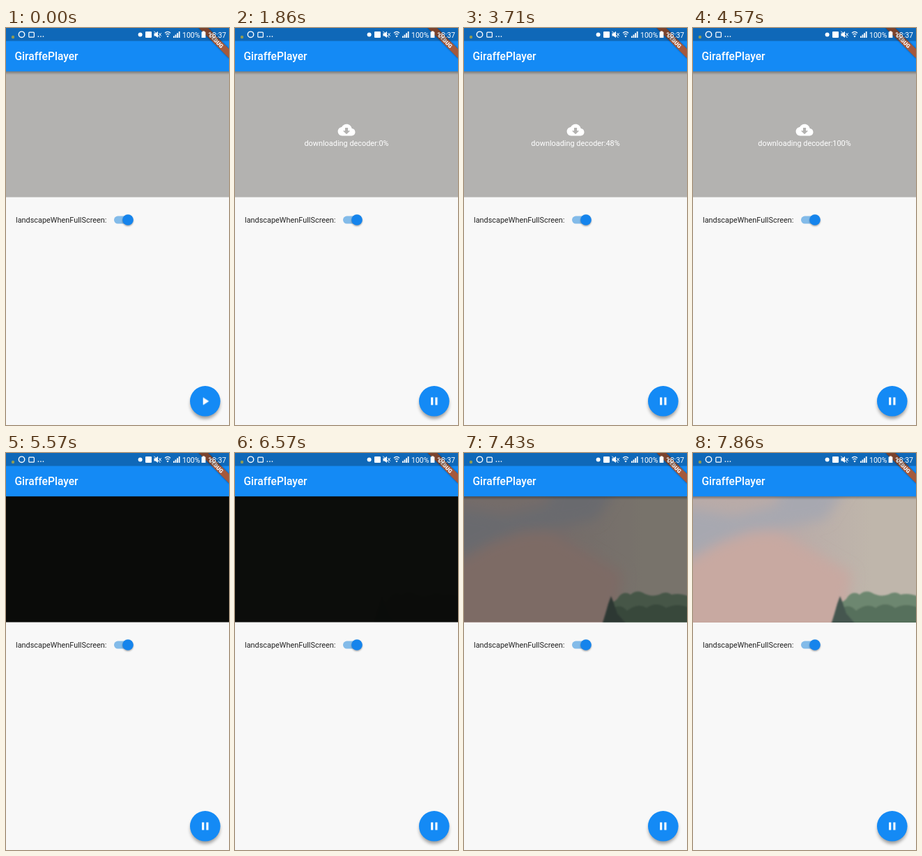
Write an HTML page that moves like this. It is 320 by 569 pixels and loops after 8000 ms.

```html
<!DOCTYPE html>
<html lang="en">
<head>
<meta charset="utf-8">
<title>Player demo</title>
<style>
html, body { margin: 0; width: 100%; height: 100%; overflow: hidden; background: #f8f8f8; }
svg { display: block; width: 320px; height: 569px; font-family: Roboto, sans-serif; }
.title { font-size: 15.6px; font-weight: 500; fill: #fff; }
.label { font-size: 10.9px; fill: #222; }
.info { font-size: 10.9px; fill: #fff; text-anchor: middle; }
.status { font-size: 10.5px; fill: #fff; }
.dots { font-size: 12.5px; font-weight: 500; fill: #fff; }
.debug { font-size: 7.9px; font-weight: 900; fill: #fff; text-anchor: middle; }
.play, .pause, .download, .screen, .video { animation: 8s step-end infinite; }
.play { animation-name: play; }
.pause { animation-name: pause; }
.download { animation-name: download; }
.screen { animation-name: screen; }
.video { animation-name: video; }
@keyframes play { 0% { opacity: 1; } 17.875%, 100% { opacity: 0; } }
@keyframes pause { 0% { opacity: 0; } 17.875%, 100% { opacity: 1; } }
@keyframes download { 0% { opacity: 0; } 17.875% { opacity: 1; } 62.5%, 100% { opacity: 0; } }
@keyframes screen { 0% { fill: #b3b2b0; } 62.5%, 100% { fill: #0a0b09; } }
@keyframes video {
  0% { opacity: 0; }
  82.125% { opacity: .015; animation-timing-function: steps(4, end); }
  89.25% { opacity: .35; animation-timing-function: steps(5, end); }
  98.25%, 100% { opacity: 1; }
}
</style>
</head>
<body>
<svg viewBox="0 0 320 569">
  <defs>
    <clipPath id="frame"><rect y="62" width="320" height="180.5"/></clipPath>
    <filter id="soft" x="-20%" y="-20%" width="140%" height="140%"><feGaussianBlur stdDeviation="9"/></filter>
    <filter id="blur" x="-50%" y="-50%" width="200%" height="200%"><feGaussianBlur stdDeviation="2.6"/></filter>
    <filter id="fine" x="-50%" y="-50%" width="200%" height="200%"><feGaussianBlur stdDeviation="1"/></filter>
    <linearGradient id="shade" x2="0" y2="1">
      <stop stop-opacity=".32"/><stop offset="1" stop-opacity="0"/>
    </linearGradient>
    <linearGradient id="sky" x2="1" y2="0">
      <stop offset=".45" stop-color="#b9aba8"/><stop offset=".8" stop-color="#bfb6ab"/>
    </linearGradient>
  </defs>

  <rect width="320" height="569" fill="#f8f8f8"/>
  <rect class="screen" y="62" width="320" height="180.5"/>

  <g class="video" clip-path="url(#frame)">
    <rect y="62" width="320" height="181" fill="url(#sky)"/>
    <g filter="url(#soft)">
      <path d="M-30 75L60 90L120 75L130 40H225L190 95L125 108L80 112L40 127L-30 165Z" fill="#a7a8b0"/>
      <path d="M-30 165L0 152L40 129L84 114L118 112L155 130L190 150L228 172L212 270H-30Z" fill="#c8a9a1"/>
    </g>
    <g filter="url(#fine)">
      <path d="M212 246V214Q219 212 222 206Q230 197 239 203Q247 196 256 200Q268 207 280 203Q290 197 298 203Q310 200 324 206V246Z" fill="#6d8770"/>
      <path d="M212 246V224Q224 214 234 226Q250 214 262 222Q276 212 290 222Q306 214 324 222V246Z" fill="#566f5c"/>
      <path d="M198 246L203 230L207 216L211 205L215 215L220 230L234 246Z" fill="#455650"/>
    </g>
  </g>

  <g class="download" fill="#fff">
    <path transform="translate(147.6 133.7) scale(1.037)" d="M19.35 10.04C18.67 6.59 15.64 4 12 4 9.11 4 6.6 5.64 5.35 8.04 2.34 8.36 0 10.91 0 14c0 3.31 2.69 6 6 6h13c2.76 0 5-2.24 5-5 0-2.64-2.05-4.78-4.65-4.96zM17 13l-5 5-5-5h3V9h4v4h3z"/>
    <text class="info" x="160" y="168.6">downloading decoder:<tspan id="percent">0</tspan>%</text>
  </g>

  <rect y="62" width="320" height="5" fill="url(#shade)"/>
  <rect width="320" height="62.2" fill="#148af5"/>
  <text class="title" x="12.4" y="46">GiraffePlayer</text>

  <g transform="translate(320) rotate(45)">
    <rect x="-31" y="21.2" width="62" height="9.4" opacity=".45" filter="url(#fine)"/>
    <rect x="-32" y="21.2" width="64" height="9.4" fill="#a4593c"/>
    <text class="debug" y="28.7">DEBUG</text>
  </g>
  <rect width="320" height="18.6" opacity=".25"/>

  <g fill="#fff">
    <circle cx="10" cy="13" r="2.2" fill="#8f9b55"/>
    <circle cx="22.5" cy="9.3" r="4.2" fill="none" stroke="#fff" stroke-width="1.4"/>
    <rect x="32.8" y="6.2" width="7.6" height="7" rx="1" fill="none" stroke="#fff" stroke-width="1.2"/>
    <text class="dots" x="44.8" y="13.4">...</text>
    <circle cx="192.6" cy="9.4" r="3"/>
    <rect x="200" y="5" width="9" height="9" rx="1"/>
    <path d="M212.5 7.5H214.5L218 4.8V14L214.5 11.5H212.5Z"/>
    <path d="M219.4 7.2L222.8 11.6M222.8 7.2L219.4 11.6M212.4 4.6L221.5 14" stroke="#fff" stroke-width="1"/>
    <path d="M228 7.3Q232 3.6 236 7.3M229.5 9.4Q232 7.2 234.5 9.4" fill="none" stroke="#fff" stroke-width="1.2"/>
    <path d="M230.4 11H233.6L232 13.8Z"/>
    <path d="M240 11.5h1.8v2.5h-1.8zM242.6 9.5h1.8v4.5h-1.8zM245.2 7.2h1.8v6.8h-1.8zM247.8 5h1.8v9h-1.8z"/>
    <text class="status" x="253" y="13.6">100%</text>
    <path d="M280.6 5.4H282V4.4H285V5.4H286.4V14H280.6Z"/>
    <text class="status" x="289.8" y="13.6">18:37</text>
  </g>

  <text class="label" x="14" y="279">landscapeWhenFullScreen:</text>
  <rect x="155" y="269.6" width="25.7" height="10.9" rx="5.45" fill="#83bbe9"/>
  <circle cx="175" cy="276.2" r="7.8" opacity=".35" filter="url(#fine)"/>
  <circle cx="175" cy="275" r="7.8" fill="#1584ec"/>

  <circle cx="285.8" cy="539" r="21" opacity=".38" filter="url(#blur)"/>
  <circle cx="285.8" cy="534.8" r="21.8" fill="#148af5"/>
  <g transform="translate(276.5 525.5) scale(.778)" fill="#fff">
    <path class="play" d="M8 5v14l11-7z"/>
    <path class="pause" d="M6 19h4V5H6v14zm8-14v14h4V5h-4z"/>
  </g>
</svg>
<script>
const LOOP = 8000, TICK = LOOP / 56;
const percent = document.getElementById('percent');
const clamp = v => Math.min(1, Math.max(0, v));
let start;

// Slow first part up to 18 %, then a steady run to 100 %.
function progress(t) {
  const step = Math.floor((t + 4) / TICK);
  return Math.round(18 * clamp((step - 14) / 7) + 82 * clamp((step - 21) / 11));
}

function draw(now) {
  start ??= now;
  percent.textContent = progress((now - start) % LOOP);
  requestAnimationFrame(draw);
}
requestAnimationFrame(draw);
</script>
</body>
</html>
```
